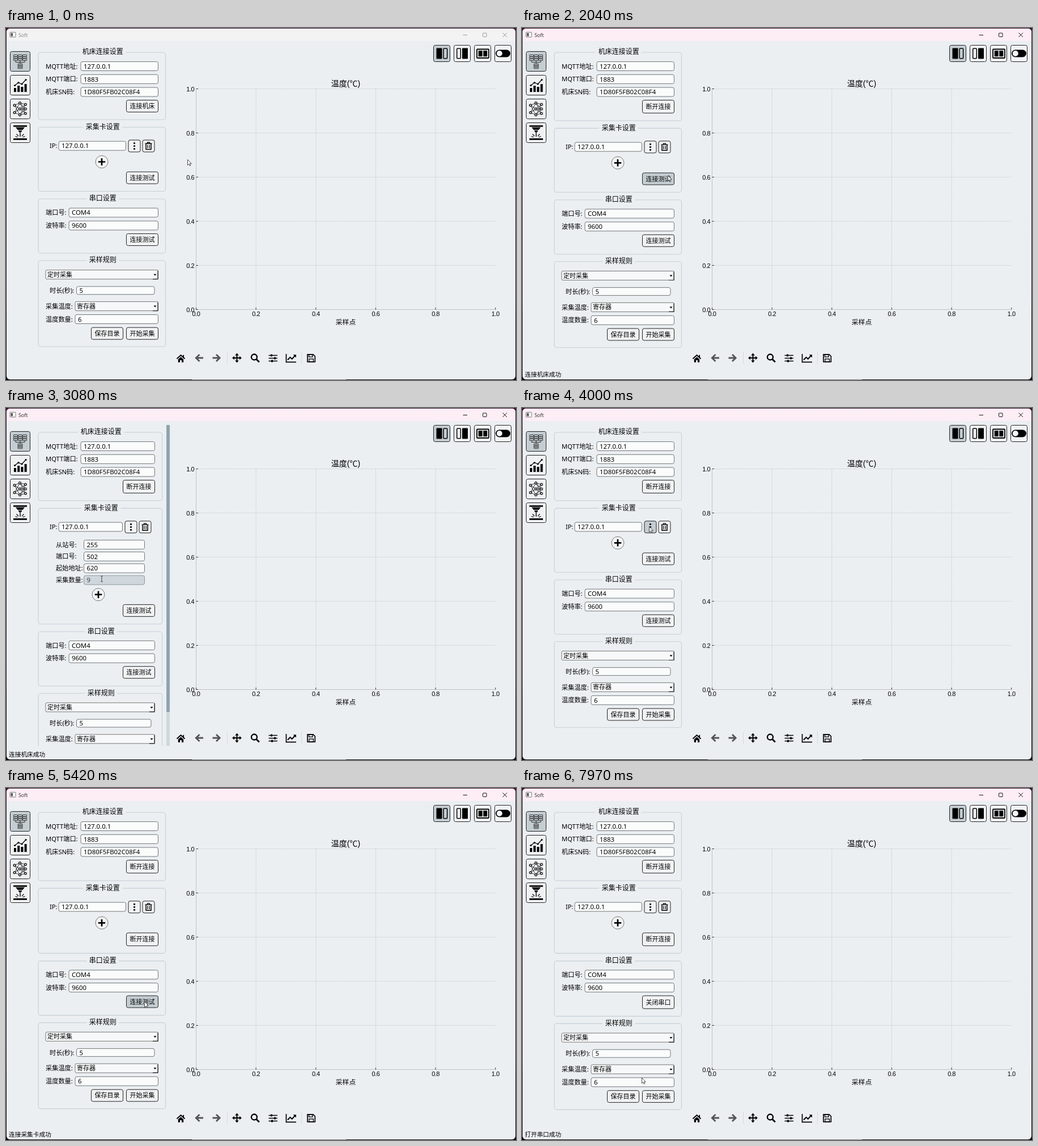
Recreate the animation shown at these times as an HTML page. Size 900 px wide and 622 px high, loop 8 s.

```html
<!DOCTYPE html>
<html lang="zh-CN">
<head>
<meta charset="utf-8">
<title>Soft</title>
<style>
html, body { margin: 0; width: 100%; height: 100%; overflow: hidden; background: #1d0c19; }
svg { display: block; width: 900px; height: 622px; }
text { font-family: "Noto Sans", "Open Sans", "Noto Sans CJK SC", "Noto Sans CJK", sans-serif; white-space: pre; }
.plot text { font-family: "Liberation Sans", "Noto Sans CJK SC", "Noto Sans CJK", sans-serif; }
.tick { letter-spacing: -.5px; }
</style>
</head>
<body>
<svg viewBox="0 0 900 622">
  <defs>
    <linearGradient id="desk" x2="0" y2="1">
      <stop offset="0" stop-color="#3b1530"/><stop offset=".78" stop-color="#2c1026"/>
      <stop offset=".82" stop-color="#08060a"/><stop offset="1" stop-color="#08060a"/>
    </linearGradient>
    <clipPath id="win"><rect x="1" y="1" width="898" height="620" rx="6"/></clipPath>
    <clipPath id="view"><rect x="50" y="30" width="240" height="567"/></clipPath>
  </defs>
  <rect width="900" height="622" fill="url(#desk)"/>
  <path d="M328 621.5H600" stroke="#777"/>
  <g clip-path="url(#win)">
    <rect width="900" height="622" fill="#ebeff2"/>
    <rect id="bar" width="900" height="23"/>
  </g>
  <g id="caption"></g>
  <g id="fixed"></g>
  <g id="panel" clip-path="url(#view)"></g>
  <text id="status" x="5" y="616.4" font-size="10.7"></text>
  <g id="mouse">
    <path id="arrow" d="M.5 .5V10.4L2.8 8.3L4.3 11.6L5.8 10.9L4.4 7.7H7.3Z" fill="#fff" stroke="#222" stroke-width=".8"/>
    <path id="beam" d="M-2 -5H-.6L0 -4.4L.6 -5H2M0 -4.4V4.4M-2 5H-.6L0 4.4L.6 5H2" fill="none" stroke="#333" stroke-width=".9"/>
  </g>
</svg>
<script>
const LOOP = 8000, BG = '#ebeff2', HOVER = '#c4cdd2';
const $ = id => document.getElementById(id);

// time, x, y of the pointer
const TRACK = [
  [0, 320, 232], [40, 320, 232], [610, 246, 137], [960, 246, 137], [1540, 257, 260],
  [2040, 257, 260], [2310, 226, 209], [2760, 226, 209], [3080, 169, 302], [3150, 168, 303],
  [3320, 168, 303], [3530, 224, 209], [4010, 224, 209], [4560, 243, 262], [4840, 243, 262],
  [5420, 244, 377], [6400, 244, 377], [6680, 211, 449.5], [6940, 211, 450], [7400, 211, 501],
  [7940, 211, 501], [7970, 211, 511.5], [8000, 211, 511.5]
];
const STATUS = [[0, ''], [920, '连接机床成功'], [3960, ''], [4800, '连接采集卡成功'], [6060, '打开串口成功']];

function pointer(t) {
  const i = TRACK.findIndex(k => k[0] > t), a = TRACK[i - 1], b = TRACK[i];
  let u = (t - a[0]) / (b[0] - a[0]);
  u = u * u * (3 - 2 * u);
  return { x: a[1] + (b[1] - a[1]) * u, y: a[2] + (b[2] - a[2]) * u };
}

const rect = (x, y, w, h, fill, stroke = 'none', r = 0, sw = 1) =>
  `<rect x="${x}" y="${y}" width="${w}" height="${h}" rx="${r}" fill="${fill}" stroke="${stroke}" stroke-width="${sw}"/>`;
const line = (d, w = 1, c = '#000', extra = '') =>
  `<path d="${d}" fill="none" stroke="${c}" stroke-width="${w}" ${extra}/>`;
const solid = (d, c = '#000') => `<path d="${d}" fill="${c}"/>`;
const dot = (x, y, r, fill = '#000', stroke = 'none', w = 1) =>
  `<circle cx="${x}" cy="${y}" r="${r}" fill="${fill}" stroke="${stroke}" stroke-width="${w}"/>`;
// y is the middle of the line
const text = (s, x, y, size = 11.2, anchor = 'start', extra = '') =>
  `<text x="${x}" y="${y + size * .37}" font-size="${size}" text-anchor="${anchor}" ${extra}>${s}</text>`;

function sidebar() {
  let s = '';
  [41.5, 83.5, 125.5, 167.5].forEach((y, i) => s += rect(7.5, y, 35, 35, i ? '#eff1f3' : HOVER, '#222', 3));
  // tree of servers
  for (const x of [13.5, 21.5, 29.5]) {
    for (const y of [47.5, 51, 54.5]) s += rect(x, y, 7, 3, 'none', '#222', .6, .9);
    s += line(`M${x + 3.5} 57.5V60.5`, .9, '#222');
  }
  s += line('M17 60.5H33M25 60.5V63', .9, '#222');
  for (const y of [63, 66, 69]) s += rect(21, y, 8, 2.6, 'none', '#222', .6, .9);
  // bars with a trend
  [[14, 7], [20.2, 11], [26.4, 9], [32.6, 14]].forEach(([x, h]) => s += rect(x, 113 - h, 4, h, '#000'));
  s += line('M15.5 101.5L22 96.5L28 99L35 91.5', 1.3);
  for (const [x, y] of [[15.5, 101.5], [22, 96.5], [28, 99], [35, 91.5]]) s += dot(x, y, 1.6);
  // network
  const layers = [[15, [136.5, 149.5]], [24.5, [132.5, 143, 153.5]], [34.5, [135, 143, 151]]];
  for (let i = 0; i < 2; i++)
    for (const a of layers[i][1]) for (const b of layers[i + 1][1])
      s += line(`M${layers[i][0]} ${a}L${layers[i + 1][0]} ${b}`, .8);
  for (const [x, ys] of layers) for (const y of ys) s += dot(x, y, 1.9, '#eff1f3', '#000', 1.2);
  // nozzle
  s += rect(13, 172, 24, 2.6, '#000') + solid('M17 175.5H33L29.5 180H20.500Z') + solid('M21.500 181H28.5L26.5 184.500H23.500Z');
  s += line('M25 185V192', 1.4) + line('M22 191L18.500 187.500M28 191L31.5 187.500M20.500 193L16.500 191.500M29.500 193L33.500 191.500', 1.1);
  s += rect(13, 195, 24, 2.8, '#000');
  return s;
}

function viewButtons() {
  let s = '';
  [754.5, 790.5, 826.5, 862.5].forEach((x, i) => s += rect(x, 30.5, 29, 29, i ? '#f1f3f4' : HOVER, '#222', 3));
  s += rect(759.5, 35.5, 10, 19, '#000', 'none', 1) + rect(772, 36.2, 6.6, 17.6, 'none', '#000', 1, 1.5);
  s += rect(795.7, 36.2, 6.6, 17.6, 'none', '#000', 1, 1.5) + rect(805, 35.5, 10, 19, '#000', 'none', 1);
  s += rect(831, 37.5, 21, 15.5, 'none', '#000', 1, 1.8) + rect(833.7, 40, 7, 10.4, '#000') + rect(842.3, 40, 7, 10.4, '#000');
  s += rect(864, 38.5, 26, 13, '#000', 'none', 6.5) + dot(870.8, 45, 5, '#f5f6f7');
  return s;
}

function chart() {
  const X = i => 335.5 + 105.65 * i, Y = i => 497.5 - 78 * i;
  let s = '<g class="plot">';
  for (let i = 0; i < 6; i++) {
    const v = (i / 5).toFixed(1), dash = 'stroke-dasharray="1.6 .8"';
    if (i) s += line(`M335.5 ${Y(i)}H863.8`, .7, '#bfc4c6', dash);
    if (i && i < 5) s += line(`M${X(i)} 107.5V497.5`, .7, '#bfc4c6', dash);
    s += text(v, 332, Y(i), 11, 'end', 'class="tick"') + text(v, X(i), 504.6, 11, 'middle', 'class="tick"');
  }
  s += line('M335.5 107.5V497.5H863.8', .8, '#b4b8ba');
  for (let i = 0; i < 6; i++) s += line(`M335.5 ${Y(i)}h3.5M${X(i)} 497.5v-3.5`, .9, '#222');
  return s + text('温度(℃)', 599.5, 98, 14, 'middle') + text('采样点', 599.5, 520, 11.8, 'middle') + '</g>';
}

function toolbar() {
  const grey = '#555';
  let s = line('M301.5 584.5L308.5 578L315.500 584.5', 1.9) + rect(312.2, 577.8, 1.9, 4, '#000');
  s += solid('M303.800 585.5L308.5 581.2L313.200 585.5V590.800H310V587H307V590.800H303.800Z');
  s += line('M348 583H335.5M341.500 577L335.300 583L341.500 589', 2.8, grey);
  s += line('M364.500 583H377M371 577L377.200 583L371 589', 2.8, grey);
  s += line('M390.5 572V594M521.5 572V594', 1, '#d5dade');
  s += line('M401 583H414M407.500 576.500V589.500', 2);
  s += solid('M407.500 574.500l3.300 4h-6.600zM407.500 591.500l3.300 -4h-6.600zM399 583l4 -3.300v6.600zM416 583l-4 -3.300v6.600z');
  s += dot(438, 581.5, 5, 'none', '#000', 2.3) + line('M441.700 585.2L446.800 590.2', 2.9);
  [[578.5, 467], [583.5, 473], [588.5, 468]].forEach(([y, x]) => s += line(`M463.5 ${y}H479`, 1.5) + rect(x, y - 1.9, 3, 3.8, '#000'));
  s += line('M494.500 576V590.300H512', 1.7) + line('M497 586.500L501.500 581.800L504.700 584.800L510 579', 2) + solid('M506.800 577.200H512V582.400Z');
  s += line('M532 576.800H542L545.300 580V590H532Z', 1.7) + rect(534.5, 577, 6.5, 4.2, 'none', '#000', 0, 1.3) + rect(534.8, 584.8, 7.600, 5, 'none', '#000', 0, 1.3);
  return s;
}

function caption(on) {
  const c = on ? '#111' : '#999';
  return rect(7, 7.5, 10, 8.5, '#fff', '#777', .5) + rect(8.5, 9, 3.5, 5.5, '#555') +
    text('Soft', 22, 12.3, 8.9, 'start', `fill="${on ? '#333' : '#888'}"`) +
    line('M806.500 12.500H814', 1, c) + rect(841.500, 9, 6.5, 6.5, 'none', c, 1) +
    line('M876.500 8.500L884 16M884 8.500L876.500 16', 1, c);
}

// Draws the settings column; returns markup and whether the pointer is over an input.
function panel(t, m) {
  const linked = [920, 4800, 6060].map(at => t >= at), open = t >= 2350 && t < 3800;
  const right = open ? 262.5 : 268.5, GROW = 1.8;
  let s = '', beam = false, dy = 0;
  const over = (x, y, w, h, e = 1) => m.x > x && m.x < x + w && m.y > y + e && m.y < y + h - e;

  const group = (title, y, h) => {
    const w = right + 13 - 57, cx = 58.5 + w / 2, gap = title.length * 12 + 9;
    s += rect(57, y + dy, w, h, 'none', '#c5d0d5', 4, 1.1) + rect(cx - gap / 2, y + dy - 2, gap, 4, BG);
    s += text(title, cx, y + dy - 1, 12, 'middle');
  };
  const field = (label, lx, x, cy, value, end = right, h = 16) => {
    const y = cy + dy - h / 2, hot = over(x, y, end - x, h);
    if (over(x, y, end - x, h, 0)) beam = true;
    s += text(label, lx, cy + dy) + rect(x, y, end - x, h, hot ? '#cfd7dc' : '#fafbfb', hot ? '#8a979e' : '#70777a', 3);
    s += text(value, x + 5, cy + dy, 11.4, 'start', hot ? 'fill="#444"' : '');
  };
  const combo = (x, cy, value) => {
    const y = cy + dy - 8, hot = over(x, y, right - x, 16);
    s += rect(x, y, right - x, 16, hot ? '#cfd7dc' : '#f7f8f9', '#777', 2);
    s += line(`M${right - .5} ${y + 1}v15h-9`, 1.2, '#222');
    s += solid(`M${right - 8} ${cy + dy - 1}h5l-2.5 3z`) + text(value, x + 3, cy + dy, 11);
  };
  const button = (label, x, y, tall = 0) => {
    const h = 21 + tall;
    y += dy;
    s += rect(x, y, 56, h, over(x, y, 56, h) ? HOVER : '#f1f2f3', '#222', 3) + text(label, x + 28, y + h / 2, 11, 'middle');
  };
  const square = (x, y) => s += rect(x, y, 21, 21, over(x, y, 21, 21) ? HOVER : '#f1f2f3', '#222', 3);
  const action = (i, y, off, on) => {
    button(linked[i] ? on : off, right - 56, y, linked[i] ? GROW : 0);
    if (linked[i]) dy += GROW;
  };

  group('机床连接设置', 43, 119 + (linked[0] ? GROW : 0));
  field('MQTT地址:', 70, 132, 67.5, '127.0.0.1');
  field('MQTT端口:', 70, 132, 90.3, '1883');
  field('机床SN码:', 70, 132, 113, '1D80F5FB02C08F4');
  action(0, 127.5, '连接机床', '断开连接');

  const extra = open ? 91.4 : 0;
  group('采集卡设置', 175.3, 113.2 + extra + (linked[1] ? GROW : 0));
  field('IP:', 77, 93, 208.2, '127.0.0.1', right - 57);
  const bx = right - 52.5, by = 198 + dy, cy = by + 10.5;
  square(bx, by);
  square(bx + 25, by);
  for (const k of [-5, 0, 5]) s += dot(bx + 10.5, cy + k, 1.6);
  const tx = bx + 35.5;
  s += line(`M${tx - 6} ${cy - 4.2}h12M${tx - 2} ${cy - 4.500}v-1.700h4v1.700`, 1.4);
  s += line(`M${tx - 4.5} ${cy - 4}v10h9v-10`, 1.5) + line(`M${tx - 1.7} ${cy - 2}v6M${tx + 1.700} ${cy - 2}v6`, 1.2);
  if (open)
    [['从站号:', 255], ['端口号:', 502], ['起始地址:', 620], ['采集数量:', 9]]
      .forEach(([k, v], i) => field(k, 88, 137.5, 239.6 + 20.9 * i, v, 244.5));
  dy += extra;
  const px = right - 99.5, py = 236.5 + dy;
  s += dot(px, py, 11, '#f3f4f5', '#777') + line(`M${px - 6.2} ${py}h12.4M${px} ${py - 6.2}v12.4`, 2.7);
  action(1, 254.2, '连接测试', '断开连接');

  group('串口设置', 302, 96 + (linked[2] ? GROW : 0));
  field('端口号:', 70, 111, 326.2, 'COM4');
  field('波特率:', 70, 111, 349, '9600');
  action(2, 363.5, '连接测试', '关闭串口');

  group('采样规则', 411, 152);
  combo(70, 435.7, '定时采集');
  field('时长(秒):', 77, 124.5, 463.8, '5', right - 6.5, 14);
  s += text('采集温度:', 70, 491.6 + dy);
  combo(122, 491.6, '寄存器');
  field('温度数量:', 70, 122, 514.5, '6');
  button('保存目录', right - 118, 529.2);
  button('开始采集', right - 56, 529.2);

  if (open) s += rect(283, 30, 6, 567, '#cfd8dc') + rect(283, 30, 6, 507, '#90a4ae');
  return { s, beam };
}

const shown = {};
function put(id, markup) {
  if (shown[id] !== markup) $(id).innerHTML = shown[id] = markup;
}

function draw(t) {
  const m = pointer(t), p = panel(t, m), active = t >= 870;
  put('panel', p.s);
  put('caption', caption(active));
  put('status', STATUS.filter(k => k[0] <= t).pop()[1]);
  $('bar').setAttribute('fill', active ? '#fdeef5' : '#f3f3f3');
  $('mouse').setAttribute('transform', `translate(${m.x} ${m.y})`);
  $('arrow').style.display = p.beam ? 'none' : '';
  $('beam').style.display = p.beam ? '' : 'none';
}

put('fixed', sidebar() + viewButtons() + chart() + toolbar());
const start = performance.now();
function tick() {
  draw((performance.now() - start) % LOOP);
  requestAnimationFrame(tick);
}
tick();
</script>
</body>
</html>
```
